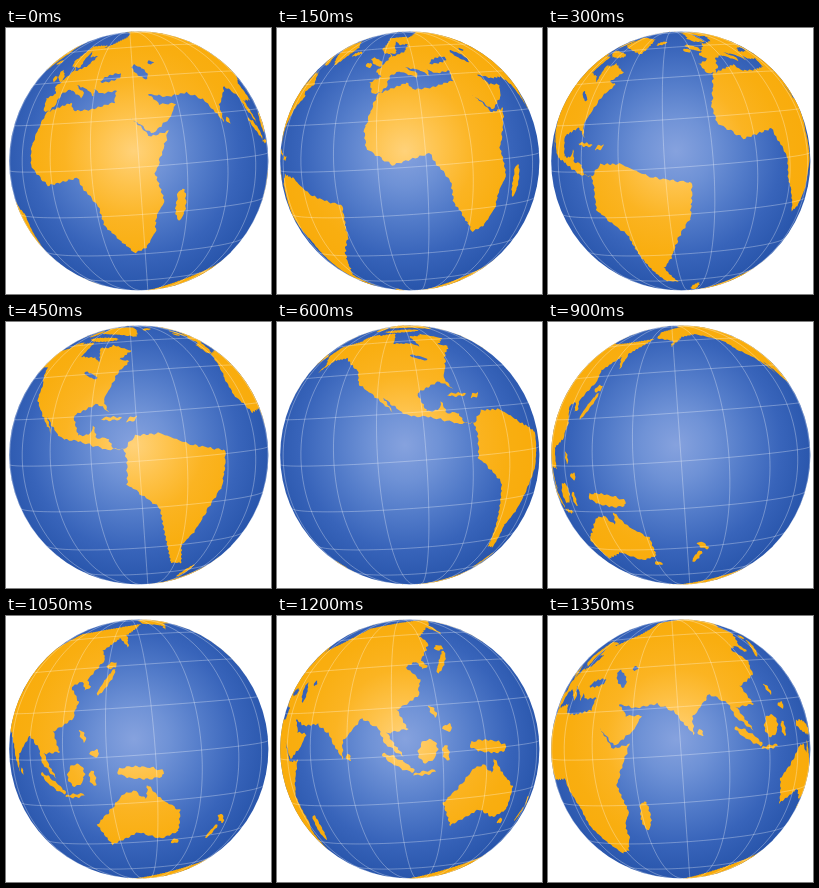
Write an HTML page with a canvas that moves like this. It is 265 by 266 pixels and loops after 1500 ms.

```html
<!DOCTYPE html>
<html>
<head>
<meta charset="utf-8">
<title>Turning globe</title>
<style>
html, body { margin: 0; width: 100%; height: 100%; overflow: hidden; background: #fff; }
canvas { display: block; }
</style>
</head>
<body>
<canvas id="globe" width="265" height="266"></canvas>
<script>
const ctx = document.getElementById('globe').getContext('2d');
const CX = 132.8, CY = 133, R = 129.6;
const STEP_MS = 150, STEPS = 10, START_LON = 35.2, GRID = 20;
const RAD = Math.PI / 180, EYE = 12;
const LENS = Math.sqrt(EYE * EYE - 1);

// Key points of each coast as lon, lat pairs, clockwise.
const africa = [-6,36, 10,37, 11,33, 20,31, 33,31, 43,12, 51,12, 40,-3, 40.5,-15, 35,-21, 33,-27,
  26,-34, 19,-35, 12,-18, 13,-9, 9,0, 8,4.5, -8,4.5, -17,14, -16,22, -10,31];
const eurasia = [-9,37, -9,43, -2,44, -4,48, 8,54, 10,57, 10,54, 20,55, 29,60, 22,61, 24,66, 17,61,
  14,55.5, 6,58, 6,62, 24,71, 41,67, 36,65, 68,69, 104,77, 140,73, 190,66, 163,60, 157,51, 156,59,
  140,54, 140,48, 128,40, 129,36, 126,35, 125,40, 118,39, 122,31, 118,24, 107,21, 109,12, 100,13,
  104,1.5, 98,9, 97,16, 91,22, 80,15, 78,8, 73,20, 67,25, 57,26, 49,30, 52,24, 59,22, 54,17, 44,13,
  32,30, 35,36, 27,37, 24,40, 23,37, 19,42, 13,45, 18,40, 16,38, 9,44, 3,43, -1,38, -5,36];
const northAmerica = [-168,66, -156,71, -95,70, -82,68, -94,59, -82,55, -79,51, -77,61, -69,59,
  -65,60, -56,52, -66,49, -61,46, -70,42, -76,36, -81,31, -80,25, -84,30, -97,28, -96,19, -91,18,
  -88,21, -88,16, -83,14, -82,9, -77,8, -85,10, -95,16, -105,20, -113,31, -110,23, -117,33,
  -124,41, -124,48, -135,59, -148,60, -164,55, -158,59];
const southAmerica = [-78,8, -72,12, -62,10, -50,1, -35,-6, -40,-20, -48,-27, -57,-37, -65,-42,
  -67,-55, -74,-52, -71,-20, -81,-6, -78,3];
const australia = [142,-11, 146,-19, 153,-27, 150,-37, 140,-38, 131,-31, 115,-34, 114,-22,
  122,-18, 131,-12, 136,-12, 140,-17];
const greenland = [-70,77, -30,83, -20,72, -42,61, -52,68];
const antarctica = [];
for (let lon = 0; lon <= 360; lon += 10) antarctica.push(lon, -71 + 4 * Math.cos((lon - 90) * RAD));

// Oval at lon, lat: half length, half width, turn from east.
function oval([lon, lat, len, wide, turn]) {
  const pts = [], c = Math.cos(turn * RAD), s = Math.sin(turn * RAD);
  for (let a = 360; a > 0; a -= 30) {
    const u = len * Math.cos(a * RAD), v = wide * Math.sin(a * RAD);
    pts.push(lon + (u * c - v * s) / Math.cos(lat * RAD), lat + u * s + v * c);
  }
  return pts;
}
const islands = [
  [47,-19,7,2.2,72], [81,7.8,1.5,1,90], [101,0,7.5,1.6,-46], [110,-7.2,4.5,.8,-8],
  [114,1,5,3.8,50], [121,-2,3.5,1.3,80], [141,-5.5,10,2.6,-20], [121.5,16,2.8,1,100],
  [125,7.5,2,1.5,0], [138,36,7,1.3,45], [143,43.5,2.2,1.6,0], [147,-42,1.6,1.4,0],
  [176,-38.5,3.2,1.2,-60], [170.5,-44,4,1.2,45], [-79.5,21.8,4.6,.7,-16], [-71,19,2.4,.9,0],
  [-2,54,4,1.5,110], [-8,53.3,1.6,1.3,90], [-19,65,2.4,1.4,0], [-73,68.5,7.5,2,-40],
  [-110,71,4,2,0], [-78,79.5,4,2,30], [-64,-66,6,1.5,50]
].map(oval);
const land = [africa, eurasia, northAmerica, southAmerica, australia, greenland, antarctica, ...islands];
const seas = [[34.5,43.3,4.6,1.7,0], [51,42,5,1.9,105], [60,45,1.2,1.2,0], [-86,45,4,.9,-45]].map(oval);

function shade(...colors) {
  const g = ctx.createRadialGradient(128, 123, 0, 128, 123, 140);
  colors.forEach((c, i) => g.addColorStop(i / (colors.length - 1), c));
  return g;
}
const oceanFill = shade('#86a2de', '#6f92d6', '#527bc9', '#3864ba', '#2855ab');
const landFill = shade('#ffd27a', '#fec34c', '#fbb422', '#f9ae10', '#f9ab0a');

// Perspective view of a tilted ball; hidden points slide out to the rim.
function makeView(tilt, roll) {
  const st = Math.sin(tilt * RAD), ct = Math.cos(tilt * RAD);
  const sr = Math.sin(roll * RAD), cr = Math.cos(roll * RAD);
  return (lon, lat, mid) => {
    const a = (lon - mid) * RAD, b = lat * RAD;
    const s = Math.sin(b), c = Math.cos(b), near = c * Math.cos(a);
    const x0 = c * Math.sin(a), y0 = ct * s - st * near, z = st * s + ct * near;
    const x = x0 * cr - y0 * sr, y = x0 * sr + y0 * cr;
    const seen = z > 1 / EYE;
    const k = seen ? LENS / (EYE - z) : 1 / (Math.hypot(x, y) || 1);
    return { x: CX + R * k * x, y: CY - R * k * y, seen };
  };
}
const landView = makeView(4, 17.5);
const gridView = makeView(2.5, 4);

// Small waves make the straight runs between key points look like coast.
function coastPoint(lon, lat, mid) {
  return landView(lon + .4 * Math.sin(2.3 * lat), lat + .4 * Math.sin(1.9 * lon), mid);
}

function outline(shape, mid) {
  const pts = [];
  for (let i = 0; i < shape.length; i += 2) {
    const j = (i + 2) % shape.length;
    const dx = shape[j] - shape[i], dy = shape[j + 1] - shape[i + 1];
    if (Math.abs(dx) === 360) continue;
    const n = Math.ceil(Math.hypot(dx, dy));
    for (let k = 0; k < n; k++) {
      pts.push(coastPoint(shape[i] + dx * k / n, shape[i + 1] + dy * k / n, mid));
    }
  }
  if (!pts.some(p => p.seen)) return;
  pts.forEach((p, i) => i ? ctx.lineTo(p.x, p.y) : ctx.moveTo(p.x, p.y));
  ctx.closePath();
}

function fillShapes(shapes, mid, paint) {
  ctx.beginPath();
  shapes.forEach(s => outline(s, mid));
  ctx.fillStyle = paint;
  ctx.fill();
}

function gridLine(from, to, at) {
  let down = false;
  for (let v = from; v <= to; v += 3) {
    const p = at(v);
    if (p.seen) down ? ctx.lineTo(p.x, p.y) : ctx.moveTo(p.x, p.y);
    down = p.seen;
  }
}

function drawGrid(shift) {
  ctx.beginPath();
  for (let lon = -120; lon <= 120; lon += GRID) gridLine(-90, 90, v => gridView(lon + shift, v, 0));
  for (let lat = -80; lat <= 80; lat += GRID) gridLine(-120, 120, v => gridView(v, lat, 0));
  ctx.strokeStyle = 'rgba(255,255,255,.3)';
  ctx.lineWidth = 1;
  ctx.stroke();
}

function draw(step) {
  const mid = START_LON - step * 360 / STEPS;
  ctx.clearRect(0, 0, 265, 266);
  ctx.beginPath();
  ctx.arc(CX, CY, R, 0, 2 * Math.PI);
  ctx.fillStyle = oceanFill;
  ctx.fill();
  fillShapes(land, mid, landFill);
  fillShapes(seas, mid, oceanFill);
  drawGrid(step % 3 * GRID / 3);
}

const start = performance.now();
let shown = -1;
function tick() {
  const step = Math.floor((performance.now() - start) / STEP_MS) % STEPS;
  if (step !== shown) draw(shown = step);
  requestAnimationFrame(tick);
}
tick();
</script>
</body>
</html>
```
